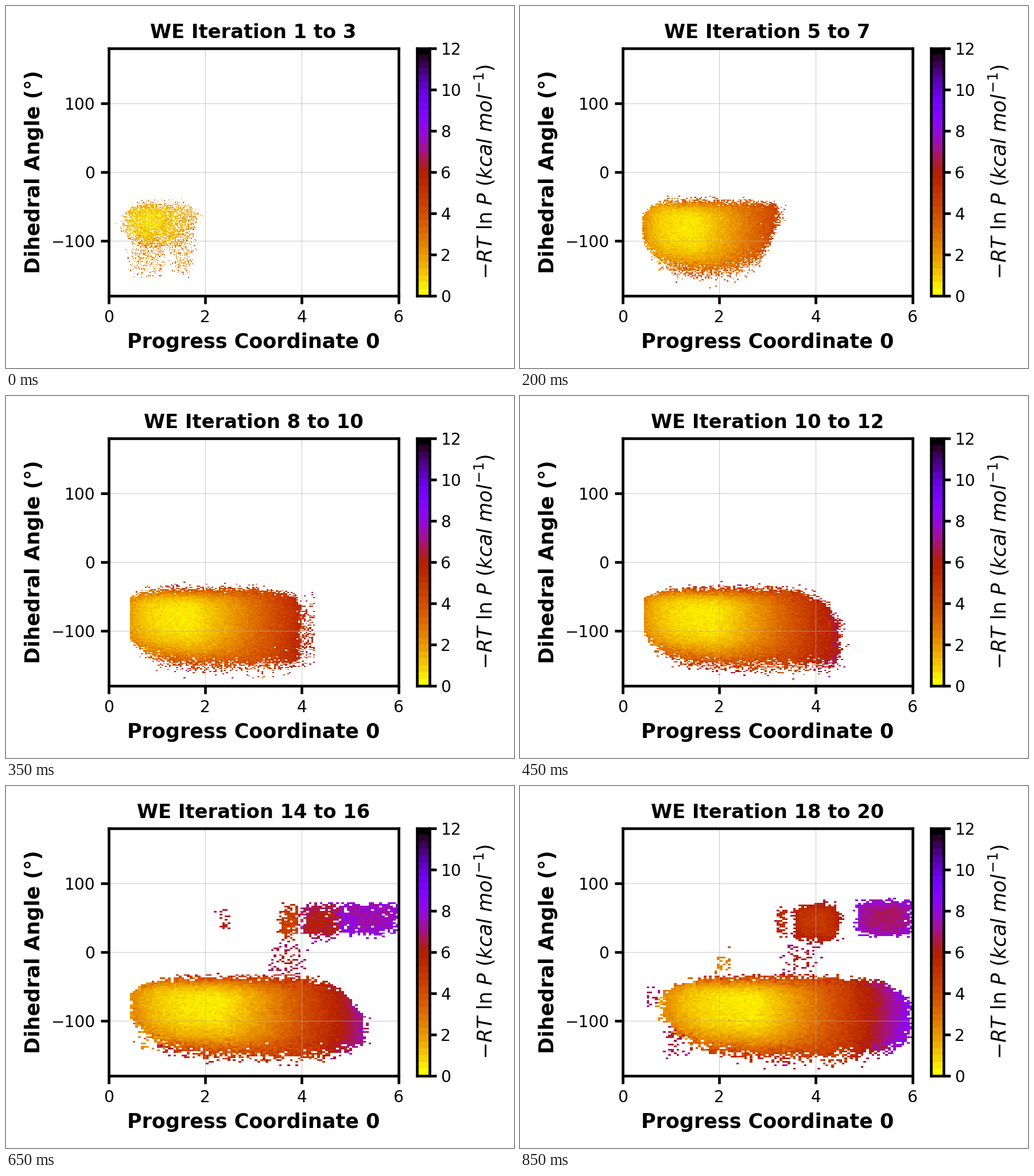
Write a matplotlib script that moves like this. It is 885 px wide and 632 px high and loops after 0.9 s.

```python
import numpy as np
import matplotlib.pyplot as plt
from matplotlib.animation import FuncAnimation

W, H, DPI = 885, 632, 64
PX = 72 / DPI            # points per pixel
PT = 168 / DPI           # design points to figure points
FRAMES, BINS = 18, 100

plt.rcParams.update({
    "font.family": "DejaVu Sans", "font.size": 12 * PT,
    "axes.linewidth": 2 * PT, "mathtext.fontset": "dejavusans",
})

# Main basin at a few moments: ends, energy at the right end, corner cuts
MOMENTS = [0, 4, 7, 11, 13, 15, 17]
LEFT = [.3, .45, .38, .5, .58, .75, .95]
RIGHT = [1.85, 3.15, 3.9, 4.9, 5.2, 5.75, 5.85]
CLIMB = [2.6, 4.2, 5.2, 7.2, 7, 7.8, 8]
CUT_TOP = [12, 2, 12, 70, 50, 32, 27]
CUT_BOTTOM = [30, 62, 2, 0, 17, 27, 18]

# Upper islands by first frame: centre x, radius x, count, energy
ISLANDS = {
    10: [(4.25, .36, 1.2, 6.4), (4.9, .45, .4, 7.2)],
    13: [(3.73, .23, 2, 4.5), (4.4, .42, 4, 5.9), (5.4, .75, 3.5, 7.3)],
    15: [(3.97, .45, 8, 4.7), (5.4, .98, 8, 6.8)],
    17: [(4.02, .48, 10, 4.8), (3.3, .13, 1, 5.4), (5.42, .57, 10, 6.7)],
}

# Sparse dust: first and last frame, centre x, y, radius x, y, energy
DUST = [
    (0, 2, .82, -122, .42, 30, 2.4),
    (0, 2, 1.55, -118, .24, 34, 2.5),
    (6, 9, 4.15, -105, .26, 55, 5.3),
    (10, 14, .9, -124, .4, 28, 2.2),
    (10, 14, 1.35, -130, .38, 24, 6.2),
    (10, 13, 2.4, 45, .17, 22, 6.3),
    (10, 17, 3.7, -12, .45, 27, 6.4),
    (14, 17, .62, -67, .18, 18, 6.7),
    (14, 17, 1.12, -130, .27, 32, 6.5),
    (14, 17, 2.08, -18, .2, 18, 2.6),
]


def at(values, k):
    return np.interp(k, MOMENTS, values)


def ramp(z):
    return 1 / (1 + np.exp(-np.clip(z, -50, 50)))


def sample(rng, energy, mean):
    """Energy seen in each bin, infinite where nothing was counted."""
    hits = rng.poisson(mean)
    seen = energy + .6 * np.log(np.maximum(mean, .8) / np.maximum(hits, 1))
    return np.where(hits > 0, seen, np.inf)


def basin(k, x, y, rng):
    lo, hi = at(LEFT, k), at(RIGHT, k)
    u = np.clip((x - lo) / (hi - lo), 0, 1)
    start = np.exp(-k / 2)
    base = .4 + .3 * start
    slope = (np.maximum(u - .36, 0) / .64) ** 1.25
    ridge = base + 1.8 * np.exp(-u / .1) + (at(CLIMB, k) - base) * slope
    top = -(35 + 11 * np.exp(-k / 6) + 18 * np.exp(-u / .08) + at(CUT_TOP, k) * u ** 11)
    bottom = (-156 + 46 * start + (48 - 23 * start) * np.exp(-u / .14)
              + at(CUT_BOTTOM, k) * u ** 9)
    mid = top + .33 * (bottom - top)
    d = np.where(y > mid, (y - mid) / (top - mid), (mid - y) / (mid - bottom))
    d = np.clip(d, 0, 2)
    rim = min(5, 2.6 + .25 * k) * (.55 + .45 * np.clip(u / .3, 0, 1))
    energy = ridge + np.maximum(rim - ridge, .6) * np.minimum(d, 1.15) ** 3
    energy = energy + rng.normal(0, .5, d.shape) * np.minimum(d, 1.2) ** 4
    full = 3.5 + 20 * (1 - np.exp(-k / 5))
    thin = .1 + .9 * np.exp(-k / 2.5)
    mean = full * np.exp(-np.log(full / .7) * d ** 4 - thin * (ridge - .4))
    mean = mean * ramp((x - lo) / .04) * ramp((hi - x) / .04)
    return sample(rng, energy, mean)


def cloud(x, y, rng, cx, cy, rx, ry, level, count=.35):
    d4 = ((x - cx) / rx) ** 4 + ((y - cy) / ry) ** 4
    energy = level + 1.3 * np.minimum(d4, 1.5) ** .75
    return sample(rng, energy, count * np.exp(-2.5 * d4))


def histogram(k):
    rng = np.random.default_rng(40 + k)
    stray = 10 <= k <= 12
    x0 = .45 - .3 * np.exp(-k / 2)
    x1 = 6.05 if k >= 13 else at(RIGHT, k) + .15 + .03 * k
    y0 = -171 + 16 * np.exp(-k)
    y1 = 174 if stray else 2.1 * k - 33 if k < 10 else 2.4 * k + 40
    mids = (np.arange(BINS) + .5) / BINS
    x, y = np.meshgrid(x0 + (x1 - x0) * mids, y0 + (y1 - y0) * mids)

    z = basin(k, x, y, rng)
    for first, last, *shape in DUST:
        if first <= k <= last:
            z = np.minimum(z, cloud(x, y, rng, *shape))
    stage = max((s for s in ISLANDS if s <= k), default=None)
    for cx, rx, count, level in ISLANDS.get(stage, []):
        cy = 42 + 5 * max(cx - 4, 0)
        z = np.minimum(z, cloud(x, y, rng, cx, cy, rx, 26, level, count))
    if stray:
        z[-1, int((2.72 - x0) / (x1 - x0) * BINS)] = 3.4
    return np.ma.masked_invalid(z), (x0, x1, y0, y1)


def box(left, top, right, bottom):
    return fig.add_axes([left / W, 1 - bottom / H, (right - left) / W, (bottom - top) / H])


def label(x, y, text, size, **kw):
    return fig.text(x / W, 1 - y / H, text, fontsize=size * PT, ha="center",
                    va="baseline", rotation_mode="anchor", **kw)


fig = plt.figure(figsize=(W / DPI, H / DPI), dpi=DPI, facecolor="white")
cmap = plt.get_cmap("gnuplot_r", 36)

ax = box(178.6, 73.6, 683.8, 506.2)
mesh = ax.imshow(np.zeros((BINS, BINS)), cmap=cmap, vmin=0, vmax=12, origin="lower",
                 aspect="auto", interpolation="nearest", zorder=0)
ax.set_xlim(0, 6)
ax.set_ylim(-180, 180)
ax.set_xticks([0, 2, 4, 6])
ax.set_yticks([-100, 0, 100])
ax.tick_params(length=6 * PT, width=2 * PT, pad=4 * PT)
ax.set_axisbelow("line")
ax.grid(color="#b0b0b0", alpha=.6, linewidth=.5 * PT)

bar = box(715.5, 73.6, 738.3, 506.2)
bar.imshow(np.arange(36)[:, None], cmap=cmap, origin="lower", aspect="auto",
           interpolation="nearest", extent=(0, 1, 0, 12))
bar.set_xticks([])
bar.set_yticks(range(0, 13, 2))
bar.yaxis.tick_right()
bar.tick_params(length=5 * PT, width=2 * PT, pad=7.5 * PX)

title = label(431, 56, "", 14.4, weight="bold")
label(431.2, 597, "Progress Coordinate 0", 15, weight="bold")
label(59.5, 290, "Dihedral Angle (°)", 15, weight="bold", rotation=90)
label(848, 289, r"$-RT\ \ln\, P\ (kcal\ mol^{-1})$", 15, rotation=90)


def update(k):
    data, extent = histogram(k)
    mesh.set_data(data)
    mesh.set_extent(extent)
    title.set_text(f"WE Iteration {k + 1} to {k + 3}")
    return mesh, title


anim = FuncAnimation(fig, update, frames=FRAMES, interval=50, repeat=True,
                     repeat_delay=0, blit=False)
plt.show()
```
